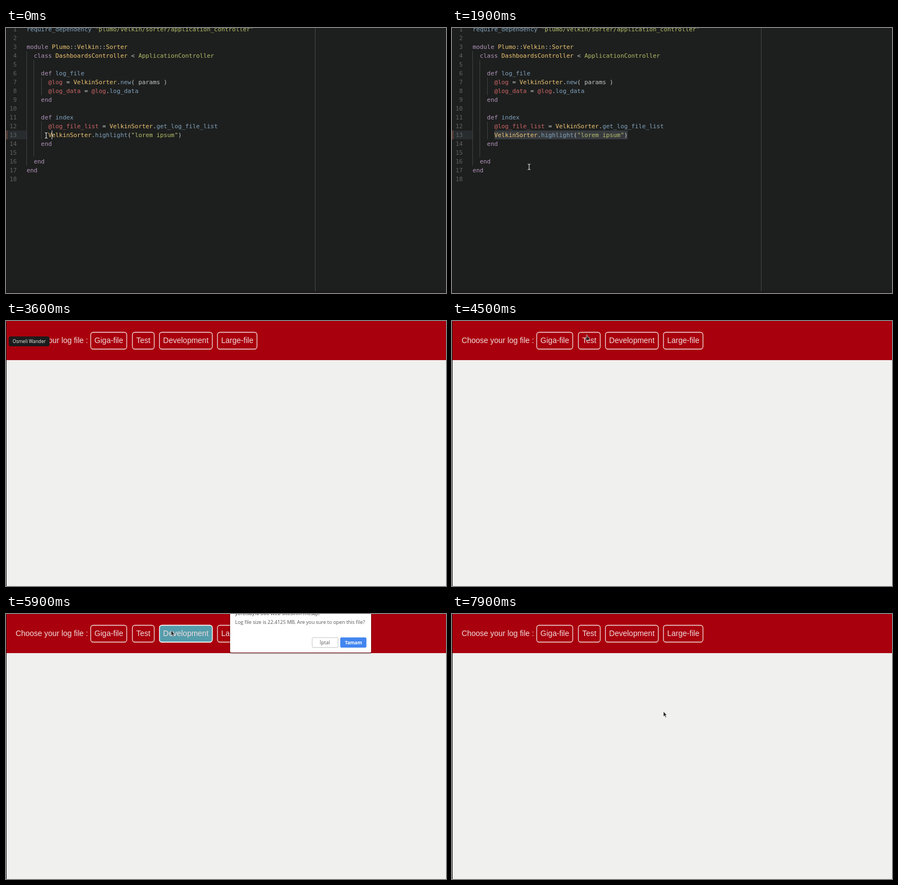
Animation of 799 by 481 pixels, one loop 8 s. Source, as an HTML page:

```html
<!DOCTYPE html>
<html lang="en">
<head>
<meta charset="utf-8">
<title>Log viewer</title>
<style>
html, body { margin: 0; width: 100%; height: 100%; overflow: hidden; }
#stage { position: relative; width: 799px; height: 481px; overflow: hidden; }
#stage div, pre, svg { position: absolute; margin: 0; box-sizing: border-box; }
#editor, #page { inset: 0; background: #1d1f1e; }
#editor::after { content: ""; position: absolute; inset: 478px 0 0; background: #1c191a; }
pre { font: 10.88px/16px "DejaVu Sans Mono", monospace; color: #c5c8c6; top: -5px; }
#code { left: 37.4px; }
#nums { left: 0; width: 19.5px; text-align: right; color: #606361; }
.k { color: #b294bb; } .y { color: #f0c674; } .r { color: #cc6666; }
.b { color: #81a2be; } .g { color: #b5bd68; }
.guide { width: 1px; background: #3f4140; }
#gutter { left: 1px; width: 36px; height: 16px; background: #282c2f; }
.sel { height: 16px; background: #373b3f; }
#mark { left: 1px; top: 186px; width: 1px; height: 16px; background: #a45b42; }
#caret { top: 186px; width: 1px; height: 16px; background: #d8dad8; }
#edge { left: -13px; top: 229px; width: 26px; height: 26px; border-radius: 50%; background: #161817; }
#edge svg { left: 14px; top: 9px; }
#tip { left: 5px; top: 28px; height: 18px; min-width: 74px; padding: 0 7px; border-radius: 4px;
  background: #1c1c1c; color: #f4f4f4; font: 8.4px/18px "Open Sans", sans-serif; white-space: nowrap; }
#page { background: #f0f0ee; }
#page svg { left: 0; top: 0; }
.bar { font: 14px "Liberation Sans", Arial, sans-serif; fill: #efdcdc; }
.ui { font: 8.95px "Open Sans", sans-serif; fill: #555; }
#dialog { left: 407px; top: -20px; width: 256px; height: 90px; background: #fff;
  border-radius: 2px; box-shadow: 0 1px 3px #0009; }
#line { left: 0; top: 0; width: 1px; height: 481px; background: #151515; }
#mouse { left: 0; top: 0; overflow: visible; }
</style>
</head>
<body>
<div id="stage">
  <div id="editor">
    <div id="gutter"></div>
    <div class="sel" id="selA" style="left:77px;top:186px"></div>
    <div class="sel" id="selB" style="left:37px;top:202px;width:46px"></div>
    <div class="guide" style="left:37px;top:42px;height:208px"></div>
    <div class="guide" style="left:50px;top:58px;height:176px"></div>
    <div class="guide" style="left:64px;top:90px;height:32px"></div>
    <div class="guide" style="left:64px;top:170px;height:32px"></div>
    <div class="guide" style="left:561px;top:0;height:478px;background:#454746"></div>
    <div id="mark"></div>
    <pre id="nums"></pre>
<pre id="code">
<span class="b">require_dependency</span> <span class="g">"plumo/velkin/sorter/application_controller"</span>

<span class="k">module</span> <span class="y">Plumo</span>::<span class="y">Velkin</span>::<span class="y">Sorter</span>
  <span class="k">class</span> <span class="y">DashboardsController</span> &lt; <span class="g">ApplicationController</span>

    <span class="k">def</span> <span class="b">log_file</span>
      <span class="r">@log</span> = <span class="y">VelkinSorter</span>.<span class="b">new</span>( params )
      <span class="r">@log_data</span> = <span class="r">@log</span>.<span class="b">log_data</span>
    <span class="k">end</span>

    <span class="k">def</span> <span class="b">index</span>
      <span class="r">@log_file_list</span> = <span class="y">VelkinSorter</span>.<span class="b">get_log_file_list</span>
      <span class="y">VelkinSorter</span>.<span class="b">highlight</span>(<span class="g">"lorem ipsum"</span>)
    <span class="k">end</span>

  <span class="k">end</span>
<span class="k">end</span>
</pre>
    <div id="caret"></div>
    <div id="edge"><svg width="8" height="8"><path d="M2 1L5 4L2 7" fill="none" stroke="#ddd" stroke-width="1.3"/></svg></div>
  </div>

  <div id="page">
    <svg width="799" height="481">
      <rect width="799" height="71" fill="#a9000d"/>
      <text class="bar" x="17.4" y="40">Choose your log file :</text>
      <g class="bar" id="buttons"></g>
    </svg>
    <div id="dialog">
      <svg width="256" height="90" class="ui">
        <text x="9" y="22" font-size="9.3" fill="#333">yerelsayfa 300 web sitesinin mesajı:</text>
        <text x="9" y="38">Log file size is 22.4125 MB. Are you sure to open this file?</text>
        <rect x="149" y="62.8" width="47" height="18" rx="2" fill="#fff" stroke="#c4c4c4"/>
        <text x="172" y="75" text-anchor="middle">İptal</text>
        <rect x="200" y="62.5" width="47.5" height="18.5" rx="2" fill="#4285f0"/>
        <text x="224" y="75" text-anchor="middle" style="fill:#fff;font-weight:700;font-size:8.5px">Tamam</text>
      </svg>
    </div>
  </div>

  <div id="line"></div>
  <div id="tip"></div>
  <svg id="mouse" width="12" height="14"><path id="shape"/></svg>
</div>

<script>
const $ = id => document.getElementById(id);
const show = (id, on) => $(id).style.opacity = +on;
const within = (t, a, b) => t >= a && t < b;
const ramp = (t, a, b) => Math.min(1, Math.max(0, (t - a) / (b - a)));

// Pointer stops: time, x, y
const path = [
  [0, 73, 195], [200, 73, 195], [700, 240, 201], [1000, 322, 206], [1100, 322, 206],
  [1300, 329, 195], [1500, 329, 195], [1900, 140, 252], [2150, 50, 262], [2400, 3, 246],
  [3800, 6, 61], [3900, 30, 58], [4200, 234, 30], [4400, 234, 30], [4500, 244, 25],
  [4700, 260, 29], [5000, 300, 30], [5900, 300, 30], [6500, 560, 47], [6900, 636, 44],
  [7400, 637, 43], [7900, 384, 177], [8000, 384, 177]
];
const cursors = {
  beam: ["M-2.5 -5Q0 -5 0 -3.5Q0 -5 2.5 -5M0 -4V4M-2.5 5Q0 5 0 3.5Q0 5 2.5 5", "none", "#e4e4e4", 1.1],
  arrow: ["M0 0V9L2 7.2L3.8 11L5.2 10.3L3.5 6.8H6.2Z", "#222", "#fff", .5],
  hand: ["M0 .5Q1.2 -.6 2 .7V4L5 4.7Q6 5 5.7 6.6L5 10H0L-2.6 6.2Q-2.2 4.7 0 6.3Z", "#3a2023", "#ddc8c8", .8]
};

function pointer(t) {
  const i = path.findIndex(p => p[0] > t), a = path[i - 1], b = path[i];
  const k = (t - a[0]) / (b[0] - a[0]);
  return [a[1] + (b[1] - a[1]) * k, a[2] + (b[2] - a[2]) * k];
}

function addButton(label, x, width, textX) {
  const hover = label + "Hover";
  $("buttons").innerHTML += `
    <rect x="${x}" y="20.5" width="${width}" height="30.5" rx="4.5" fill="none" stroke="#efdcdc" stroke-width="1.3"/>
    <rect id="${hover}" x="${x}" y="20.5" width="${width}" height="30.5" rx="4.5" fill="#559dac" stroke="#fff" stroke-width="1.3"/>
    <text x="${textX}" y="40">${label}</text>`;
  show(hover, 0);
}
addButton("Giga-file", 153.8, 65.5, 160.6);
addButton("Test", 229.5, 39.7, 236.4);
addButton("Development", 278.6, 96, 285.3);
addButton("Large-file", 384, 71.7, 390.8);
$("nums").textContent = Array.from({ length: 18 }, (_, i) => i + 1).join("\n");

function drawEditor(t, x) {
  const lower = within(t, 700, 1200);
  const column = Math.min(37, Math.max(0, Math.round((x - 77) / 6.55)));
  const width = t < 300 ? 0 : lower ? 722 : t >= 1200 ? 242 : column * 6.55;
  $("selA").style.width = width + "px";
  show("selB", lower);
  $("gutter").style.top = (lower ? 202 : 186) + "px";
  show("caret", t < 700);
  $("caret").style.left = (t < 100 ? 83 : 77 + width) + "px";
  show("edge", t >= 2400);
}

function drawPage(t) {
  show("TestHover", ramp(t, 4500, 4700) - ramp(t, 4700, 5000));
  show("DevelopmentHover", ramp(t, 4800, 5000) - ramp(t, 7000, 7400));
  show("dialog", ramp(t, 5600, 5850) - ramp(t, 6900, 7100));
}

function drawTip(t) {
  const first = t < 3300;
  $("tip").textContent = first ? "Text Editor" : "Osmeli Wander";
  $("tip").style.top = (first ? 55 : 28) + "px";
  show("tip", t < 3900 ? ramp(t, 2500, 2700) : 0);
}

function drawMouse(t, x, y) {
  const onButton = within(t, 4200, 5700);
  const [d, fill, stroke, width] = cursors[t < 3600 ? "beam" : onButton ? "hand" : "arrow"];
  const attrs = { d, fill, stroke, "stroke-width": width };
  for (const name in attrs) $("shape").setAttribute(name, attrs[name]);
  $("mouse").style.transform = `translate(${x}px, ${y}px)`;
  show("mouse", !within(t, 2400, 3900));
}

function draw(now) {
  const t = Math.floor(now % 8000 / 100) * 100; // ten pictures a second
  const [x, y] = pointer(t);
  show("page", t >= 3600);
  drawEditor(t, x);
  drawPage(t);
  drawTip(t);
  drawMouse(t, x, y);
}

const start = performance.now();
function tick() {
  draw(performance.now() - start);
  requestAnimationFrame(tick);
}
tick();
</script>
</body>
</html>
```
